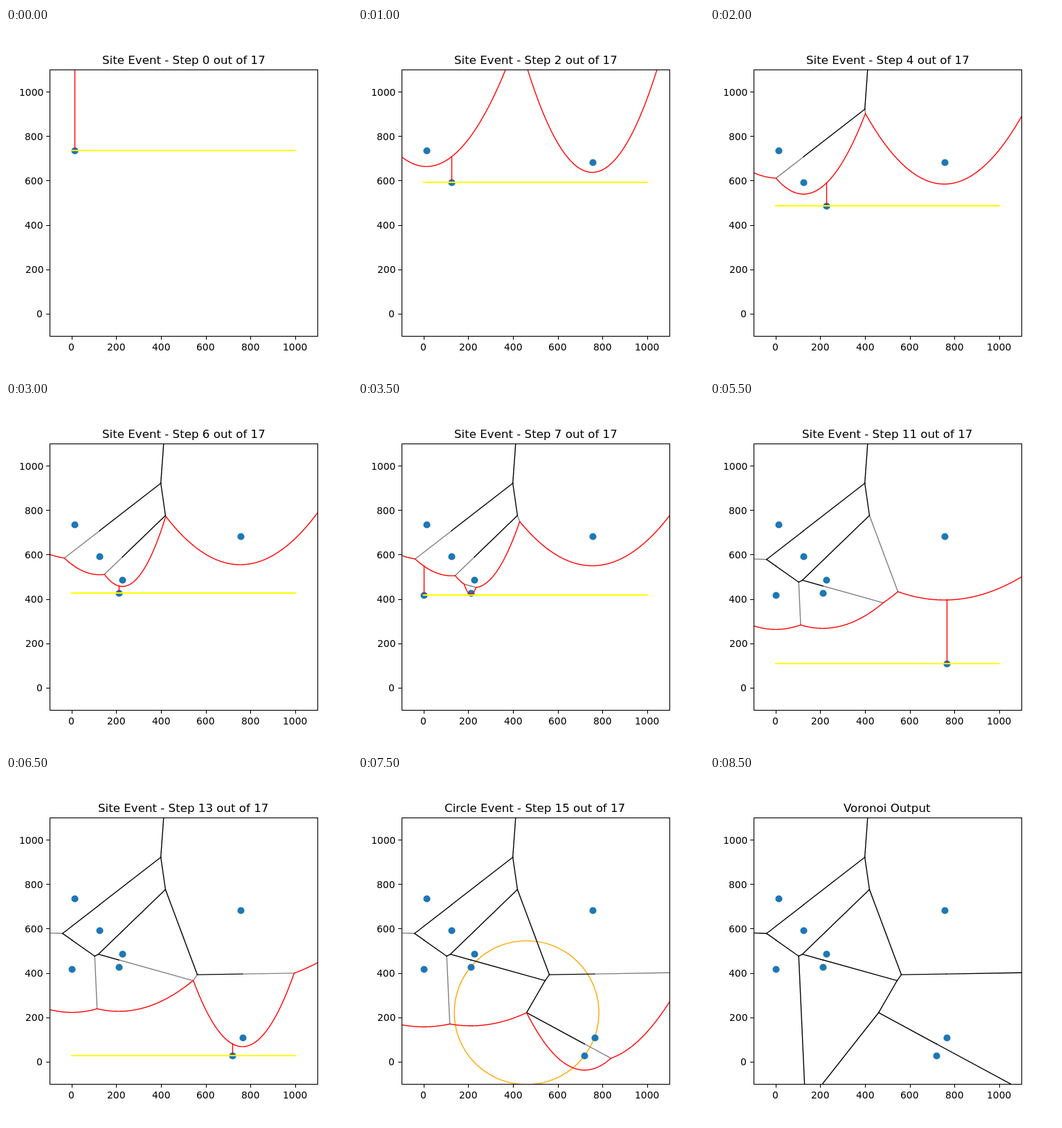
These frames come from a looping animation (500x500 px, 9000 ms). An HTML page with a canvas:

```html
<!DOCTYPE html>
<html lang="en">
<head>
<meta charset="utf-8">
<title>Sweep line Voronoi</title>
<style>
  html, body { margin: 0; width: 100%; height: 100%; overflow: hidden; background: #fff; }
  canvas { display: block; width: 500px; height: 500px; }
</style>
</head>
<body>
<canvas id="stage" width="500" height="500"></canvas>
<script>
const ctx = document.getElementById('stage').getContext('2d');
const BOX = { left: 62.5, right: 450, top: 60, bottom: 445 };
const MIN = -100, MAX = 1100, STEP_MS = 500, THIN = 1.39;
const SITES = [
  [13, 735], [755, 682], [125, 591.5], [227.5, 486],
  [210.8, 426.5], [1, 417], [764.5, 108.5], [720.5, 27.5]
].map(([x, y]) => ({ x, y }));

const scaleX = (BOX.right - BOX.left) / (MAX - MIN);
const scaleY = (BOX.bottom - BOX.top) / (MAX - MIN);
const px = x => BOX.left + (x - MIN) * scaleX;
const py = y => BOX.bottom - (y - MIN) * scaleY;
const snap = v => Math.round(v) + 0.5;

// --- geometry ---
const arcY = (s, x, sweep) => (x - s.x) ** 2 / (2 * (s.y - sweep)) + (s.y + sweep) / 2;

// Point where the beach line passes from the arc of p to the arc of q.
function breakpoint(p, q, sweep) {
  if (q.y === sweep) return { x: q.x, y: arcY(p, q.x, sweep) };
  if (p.y === sweep) return { x: p.x, y: arcY(q, p.x, sweep) };
  const u = 1 / (2 * (p.y - sweep)), v = 1 / (2 * (q.y - sweep));
  const a = u - v;
  const b = 2 * (q.x * v - p.x * u);
  const c = p.x ** 2 * u - q.x ** 2 * v + (p.y - q.y) / 2;
  const x = Math.abs(a) < 1e-15 ? -c / b : (-b + Math.sqrt(Math.max(0, b * b - 4 * a * c))) / (2 * a);
  return { x, y: arcY(p, x, sweep) };
}

// Circle through three sites, or null if their middle arc never vanishes.
function vanishingCircle(a, b, c) {
  const bx = b.x - a.x, by = b.y - a.y, cx = c.x - a.x, cy = c.y - a.y;
  const cross = bx * cy - cx * by;
  if (cross >= 0) return null;
  const b2 = bx * bx + by * by, c2 = cx * cx + cy * cy;
  const dx = (cy * b2 - by * c2) / (2 * cross), dy = (bx * c2 - cx * b2) / (2 * cross);
  const r = Math.hypot(dx, dy);
  return { x: a.x + dx, y: a.y + dy, r, bottom: a.y + dy - r };
}

// --- sweep: one snapshot per event, then the finished diagram ---
function buildSteps() {
  const steps = [], queue = SITES.slice(), done = [], seen = [];
  let beach = [], starts = [];
  const openEdges = sweep => starts.map((p, i) => [p, breakpoint(beach[i], beach[i + 1], sweep)]);

  for (;;) {
    let circle = null, at = 0;
    for (let i = 1; i < beach.length - 1; i++) {
      const c = vanishingCircle(beach[i - 1], beach[i], beach[i + 1]);
      if (c && (!circle || c.bottom > circle.bottom)) { circle = c; at = i; }
    }
    let site = null, sweep;
    if (queue.length && (!circle || queue[0].y >= circle.bottom)) {
      site = queue.shift();
      sweep = site.y;
      circle = null;
      seen.push(site);
      if (!beach.length) beach = [site];
      else {
        let i = 0;
        while (i < starts.length && breakpoint(beach[i], beach[i + 1], sweep).x < site.x) i++;
        const origin = { x: site.x, y: arcY(beach[i], site.x, sweep) };
        beach.splice(i, 1, beach[i], site, beach[i]);
        starts.splice(i, 0, origin, origin);
      }
    } else if (circle) {
      sweep = circle.bottom;
      done.push([starts[at - 1], circle], [starts[at], circle]);
      beach.splice(at, 1);
      starts.splice(at - 1, 2, circle);
    } else break;
    steps.push({ site, circle, sweep, sites: seen.slice(), done: done.slice(), open: openEdges(sweep) });
  }
  const total = steps.length;
  steps.forEach((s, i) => {
    s.title = `${s.site ? 'Site' : 'Circle'} Event - Step ${i} out of ${total}`;
  });
  steps.push({ title: 'Voronoi Output', sites: seen, done: done.concat(openEdges(-1e5)), open: [] });
  return steps;
}
const steps = buildSteps();

// --- drawing ---
function stroke(points, color, width) {
  ctx.beginPath();
  points.forEach(([x, y]) => ctx.lineTo(x, y));
  ctx.strokeStyle = color;
  ctx.lineWidth = width;
  ctx.stroke();
}

const drawEdge = ([a, b], color) => stroke([[px(a.x), py(a.y)], [px(b.x), py(b.y)]], color, THIN);

function drawBeach({ site, sweep, sites }) {
  const arcs = sites.filter(s => s.y > sweep);
  const front = x => Math.min(3000, ...arcs.map(s => arcY(s, x, sweep)));
  if (arcs.length) {
    const line = [];
    for (let x = MIN - 10; x <= MAX + 10; x++) line.push([px(x), py(front(x))]);
    stroke(line, 'red', THIN);
  }
  if (site) {
    const x = snap(px(site.x));
    stroke([[x, py(site.y)], [x, py(front(site.x))]], 'red', THIN);
  }
}

// Text placed by its inked width on whole pixels; align 0.5 = centred, 1 = right.
function label(text, x, baseline, size, align) {
  ctx.font = `${size}px "DejaVu Sans", sans-serif`;
  const m = ctx.measureText(text);
  const width = m.actualBoundingBoxRight + m.actualBoundingBoxLeft + 1.2 * 0.5 / align;
  ctx.fillText(text, Math.round(x - width * align), Math.round(baseline));
}

function drawAxes(title) {
  ctx.lineCap = 'butt';
  ctx.strokeStyle = ctx.fillStyle = '#000';
  ctx.lineWidth = 1.11;
  ctx.strokeRect(63.5, 60.5, 387, 385);
  for (let v = 0; v <= 1000; v += 200) {
    const x = snap(px(v)), y = snap(py(v));
    stroke([[x, 445.5], [x, 450.4]], '#000', 1.11);
    stroke([[58.1, y], [63, y]], '#000', 1.11);
    label(String(v), px(v), 466, 13.889, 0.5);
    label(String(v), 52.8, py(v) + 5.5, 13.889, 1);
  }
  label(title, 256.25, 52, 16.667, 0.5);
}

function draw(step) {
  ctx.fillStyle = '#fff';
  ctx.fillRect(0, 0, 500, 500);
  ctx.save();
  ctx.beginPath();
  ctx.rect(63, 60, 387, 385);
  ctx.clip();
  ctx.lineCap = 'square';
  ctx.lineJoin = 'round';
  const { circle, sweep } = step;
  if (circle) {
    ctx.beginPath();
    ctx.ellipse(px(circle.x), py(circle.y), circle.r * scaleX, circle.r * scaleY, 0, 0, 2 * Math.PI);
    ctx.strokeStyle = 'orange';
    ctx.lineWidth = THIN;
    ctx.stroke();
  }
  ctx.fillStyle = '#1f77b4';
  for (const s of step.sites) {
    ctx.beginPath();
    ctx.arc(snap(px(s.x)), snap(py(s.y)), 5.1, 0, 2 * Math.PI);
    ctx.fill();
  }
  step.open.forEach(e => drawEdge(e, 'gray'));
  step.done.forEach(e => drawEdge(e, 'black'));
  if (sweep !== undefined) {
    drawBeach(step);
    const y = Math.round(py(sweep));
    stroke([[px(0), y], [px(1000), y]], 'yellow', 2.08);
  }
  ctx.restore();
  drawAxes(step.title);
}

let shown = -1;
function tick() {
  const index = Math.floor(performance.now() / STEP_MS) % steps.length;
  if (index !== shown) draw(steps[shown = index]);
  requestAnimationFrame(tick);
}
tick();
</script>
</body>
</html>
```
